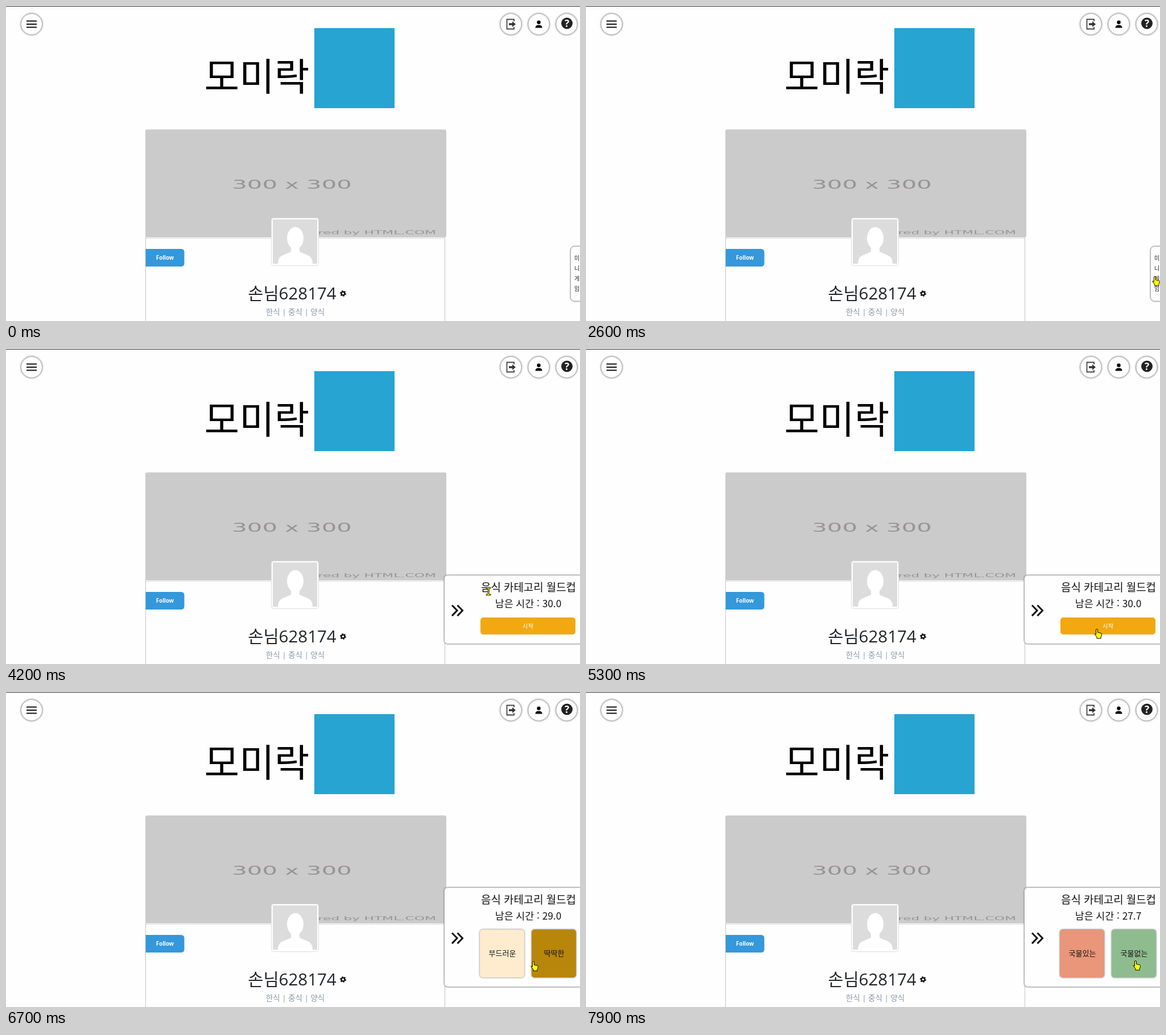
Write an HTML page that moves like this. It is 1009 by 555 pixels and loops after 8 s.

```html
<!DOCTYPE html>
<html lang="ko">
<head>
<meta charset="utf-8">
<title>프로필</title>
<style>
  html, body { margin: 0; width: 100%; height: 100%; overflow: hidden; background: #fefefe; }
  svg { display: block; width: 100%; height: 100%; }
  text { font-family: "Open Sans", "Noto Sans CJK KR", "Noto Sans CJK", sans-serif; text-anchor: middle; }
  .kr text, .logo { font-family: "Noto Sans CJK KR", "Noto Sans CJK", sans-serif; }
  .thin { font-weight: 300; }
  .wide { font-family: "DejaVu Sans", sans-serif; fill: #989394; }
  .round { fill: #fff; stroke: #bbb; filter: drop-shadow(0 0 1.5px #0009); }
  .box { fill: #fefefe; stroke: #aaa; filter: drop-shadow(0 0 1px #0007); }
  .tile { filter: drop-shadow(0 0 1.5px #0009); }
  .line { fill: none; stroke: #111; }
  #cursor path { fill: #ff0; stroke: #000; stroke-linejoin: round; }
</style>
</head>
<body>
<svg viewBox="0 0 1009 555" preserveAspectRatio="none">
  <rect width="1009" height="1" fill="#333"/>

  <!-- top buttons -->
  <g id="buttons"></g>
  <path class="line" stroke-width="2" d="M36 26.5h18M36 32h18M36 37.5h18"/>
  <path fill="none" stroke="#444" stroke-width="1.8" d="M893 27v-3.5h-12.500v17H893V37"/>
  <path fill="#333" d="M884 30.300h6V27l6 5-6 5v-3.300h-6z"/>
  <circle cx="936.500" cy="28.700" r="3.200"/>
  <path d="M930.500 38.500q0-5 6-5t6 5z"/>
  <circle cx="986" cy="30.500" r="10" fill="#222"/>
  <text x="986" y="36.500" font-size="17" font-weight="700" fill="#fff">?</text>

  <!-- brand -->
  <text class="logo" x="441" y="149" font-size="67" font-weight="500">모미락</text>
  <rect x="542" y="39" width="141" height="141" fill="#27a4d2"/>

  <!-- profile card -->
  <rect class="line" style="stroke:#c4c4c4" x="245.500" y="407" width="526" height="160"/>
  <rect x="245" y="217.500" width="529" height="190" rx="3" fill="#cbcbcb"/>
  <path class="line" style="stroke:#ddd" d="M246 409.500h526"/>
  <text class="wide" transform="translate(502.500 321.500) scale(1.940 1)" font-size="21.500">300 x 300</text>
  <text class="wide" transform="translate(756 401.500) scale(2.500 1)" font-size="9.300" style="text-anchor:end">Powered by HTML.COM</text>
  <rect x="466.500" y="373.500" width="83" height="84" rx="4" fill="#fff" stroke="#ddd"/>
  <rect x="469" y="376" width="78" height="78" fill="#dcdcdc"/>
  <ellipse cx="508.500" cy="409" rx="14.500" ry="19.500" fill="#fff"/>
  <path fill="#fff" d="M478 454q0-12 9-15l14-6v-10h15v10l14 6q9 3 9 15z"/>
  <path fill="#3498db" d="M245.500 428h62q6 0 6 6v19q0 6-6 6h-62z"/>
  <text x="279.500" y="447" font-size="9.700" font-weight="700" fill="#fff">Follow</text>
  <text x="503" y="517" font-size="29.500" fill="#212529">손님628174</text>
  <circle class="line" cx="592.500" cy="506.500" r="3" stroke-width="2.400"/>
  <circle class="line" cx="592.500" cy="506.500" r="4.600" stroke-width="1.800" pathLength="12" stroke-dasharray="1"/>
  <text x="508.500" y="544" font-size="13.500" fill="#8a97a6">한식 | 중식 | 양식</text>

  <!-- closed tab -->
  <g id="tab" class="kr" font-size="10" fill="#222">
    <rect class="box" x="992.500" y="423.500" width="40" height="96.500" rx="7"/>
  </g>

  <!-- open panel -->
  <g id="panel" class="kr" fill="#111">
    <rect id="frame" class="box" x="770.500" width="260" rx="6"/>
    <path id="chevrons" class="line" stroke-width="3" d="M784 451.500l9 9.300-9 9.300m9.500-18.600l9 9.300-9 9.300"/>
    <g id="head" class="thin">
      <text x="918.500" y="427" font-size="18.900">음식 카테고리 월드컵</text>
      <text id="clock" x="918" y="454.500" font-size="17.300"></text>
    </g>
    <g id="start">
      <rect x="834" y="473" width="167" height="30" rx="5" fill="#f2a810"/>
      <text x="917.500" y="491.500" font-size="10.500" fill="#fff">시작</text>
    </g>
    <g id="game" class="thin" font-size="13"></g>
  </g>

  <g id="cursor">
    <path id="arrow" d="M.5.5v12l2.700-2.500 2 4.200 2-1-2-4h3.600z"/>
    <path id="hand" d="M-1.500 9V1a1.500 1.500 0 0 1 3 0v4.500l5.500 1q1.500.5 1.500 2 0 3-1.500 5V16H0v-2.500l-4-5q0-2 2.500.5z"/>
    <path id="beam" stroke-width=".8" d="M-4-7h8v2H1V5h3v2h-8V5h3V-5h-3z"/>
  </g>
</svg>
<script>
const $ = id => document.getElementById(id);
const LOOP = 8000, ENTER = 800, OPEN = 3300, PLAY = 5900, NEXT = 7200;

// pointer way points: time, x, y
const way = [
  [ENTER, 990, 59], [1100, 928, 216], [1300, 982, 371], [1600, 998, 441], [2100, 998, 448],
  [3000, 1001, 494], [OPEN, 1001, 494], [3800, 892, 489], [4200, 848, 427], [4700, 964, 440],
  [4900, 899, 506], [5300, 898, 494], [PLAY, 898, 494], [6600, 919, 476], [7100, 966, 474], [LOOP, 966, 474]
];
const rounds = [
  [["부드러운", "#ffebcd"], ["딱딱한", "#b8860b"]],
  [["국물있는", "#e9967a"], ["국물없는", "#8fbc8f"]]
];

const show = (id, on) => $(id).style.display = on ? "" : "none";
const move = (id, x, y) => $(id).setAttribute("transform", `translate(${x} ${y})`);

$("buttons").innerHTML = [45, 887.5, 936.5, 985.5]
  .map(x => `<circle class="round" cx="${x}" cy="32" r="18.5"/>`).join("");
$("tab").innerHTML += [..."미니게임"]
  .map((c, i) => `<text x="1003.5" y="${447.5 + 18 * i}">${c}</text>`).join("");

// smooth curve through the way points that never overshoots
function along(n, t) {
  const i = Math.max(1, way.findIndex(p => p[0] > t));
  const rate = j => way[j] && way[j - 1] ? (way[j][n] - way[j - 1][n]) / (way[j][0] - way[j - 1][0]) : 0;
  const slope = j => {
    const a = rate(j), b = rate(j + 1);
    return a * b > 0 ? 2 * a * b / (a + b) : 0;
  };
  const [a, b] = [way[i - 1], way[i]], span = b[0] - a[0], k = (t - a[0]) / span;
  return a[n] + (b[n] - a[n]) * k * k * (3 - 2 * k)
    + span * k * (1 - k) * (slope(i - 1) * (1 - k) - slope(i) * k);
}

function drawCursor(t) {
  show("cursor", t >= ENTER);
  if (t < ENTER) return;
  const x = along(1, t), y = along(2, t), open = t >= OPEN;
  const shape = (open ? y > 470 : x > 992 && y > 423) ? "hand" : open && y < 460 ? "beam" : "arrow";
  for (const id of ["arrow", "hand", "beam"]) show(id, id === shape);
  move("cursor", x, y);
}

function drawPanel(t) {
  const playing = t >= PLAY, grow = playing ? 54 : 0;
  show("tab", t < OPEN);
  show("panel", t >= OPEN);
  show("start", !playing);
  show("game", playing);
  $("frame").setAttribute("y", 398.5 - grow);
  $("frame").setAttribute("height", 121 + grow);
  move("head", 0, -grow);
  move("chevrons", 0, -grow / 2);
  const left = playing ? 30 - (t - 5770) * 0.00108 : 30;
  $("clock").textContent = "남은 시간 : " + left.toFixed(1);
  $("game").innerHTML = rounds[t < NEXT ? 0 : 1].map(([name, color], i) =>
    `<g transform="translate(${833 + 91 * i} 418.5)">
      <rect class="tile" width="78" height="84.5" rx="5" fill="${color}"/>
      <text x="39.5" y="46.5">${name}</text></g>`).join("");
}

const begin = performance.now();
function tick() {
  const t = Math.floor((performance.now() - begin) % LOOP / 100) * 100;  // ten steps a second
  drawPanel(t);
  drawCursor(t);
  requestAnimationFrame(tick);
}
tick();
</script>
</body>
</html>
```
